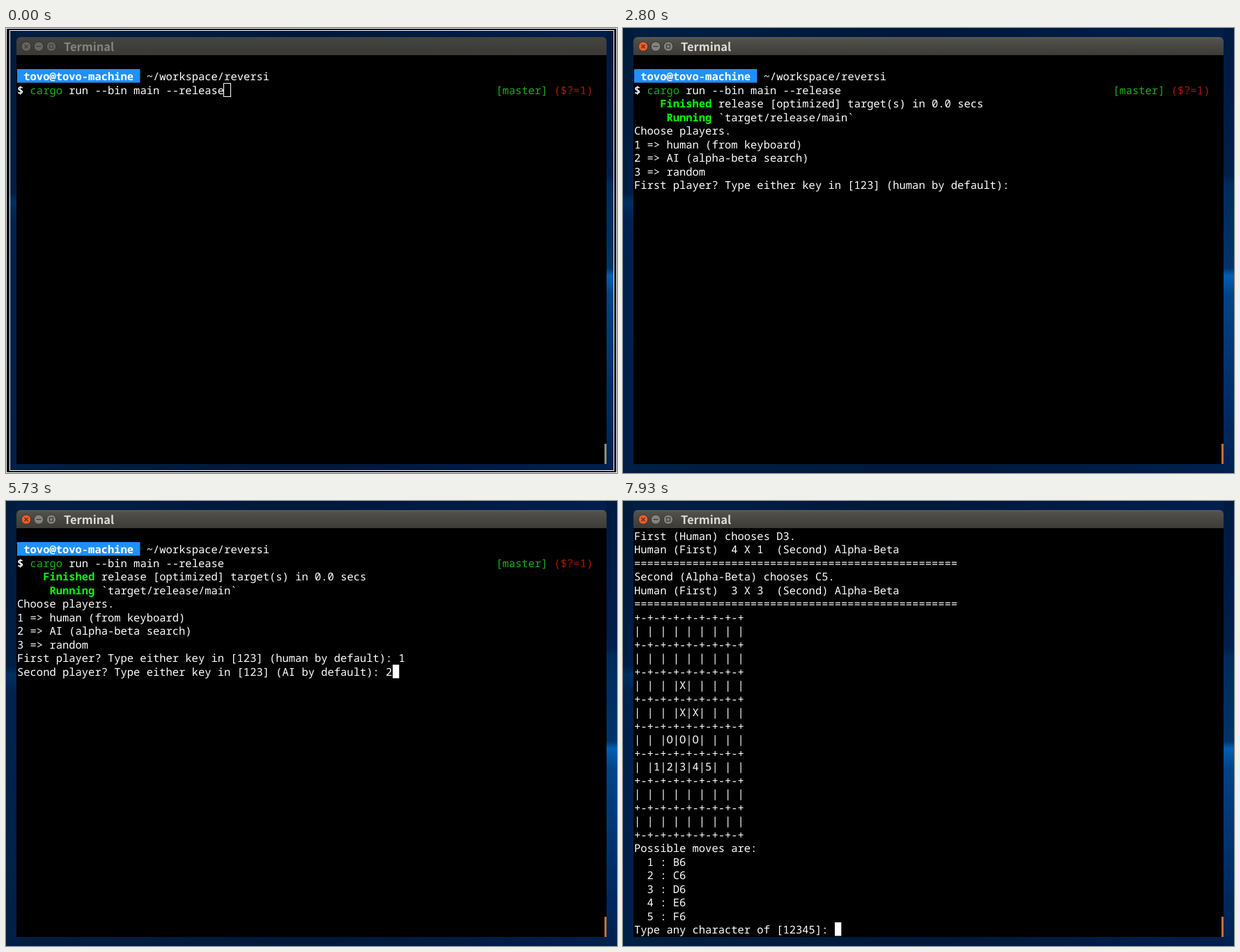
An HTML page with a canvas for the animation above (8000 ms loop, 877x639 px).

```html
<!DOCTYPE html>
<html lang="en">
<head>
<meta charset="utf-8">
<title>Terminal</title>
<style>
html, body { margin: 0; width: 877px; height: 639px; overflow: hidden; background: #001b40; }
canvas { display: block; }
</style>
</head>
<body>
<canvas id="stage" width="877" height="639"></canvas>
<script>
const ctx = document.getElementById('stage').getContext('2d');
const LOOP = 8000, W = 877, H = 639;
const LEFT = 16, TOP = 39.5, CELL = 9.286, ROW = 19.517, ROWS = 30;
const MONO = '"Noto Sans Mono", monospace';
const WHITE = '#fff', GREEN = '#18b218', LIME = '#00ff00', RED = '#b21800', BLUE = '#1e90ff';
const RULE = '='.repeat(50);

// A run is a piece of text in one style on a terminal line.
const run = (text, col = 0, color = WHITE, bold = false, back = null) => ({ text, col, color, bold, back });

function board(marks) {
  const edge = '+-'.repeat(8) + '+';
  const lines = [edge];
  for (let y = 1; y <= 8; y++) {
    lines.push('|' + [...(marks[y] || '').padEnd(8)].join('|') + '|', edge);
  }
  return lines;
}

function moves(list) {
  const keys = list.map((_, i) => i + 1).join('');
  return ['Possible moves are:', ...list.map((m, i) => `  ${i + 1} : ${m}`),
    `Type any character of [${keys}]: `];
}

// What the terminal prints, in order of time; 'more' goes on the same line.
const log = [
  { at: 0, lines: [
    '',
    [run(' tovo@tovo-machine ', 0, WHITE, true, BLUE), run('~/workspace/reversi', 20)],
    [run('$', 0, WHITE, true), run('cargo', 2, GREEN), run('run --bin main --release', 8),
      run('[master]', 74, GREEN), run('($?=1)', 83, RED)]
  ] },
  { at: 2800, lines: [
    [run('Finished', 4, LIME, true), run('release [optimized] target(s) in 0.0 secs', 13)],
    [run('Running', 5, LIME, true), run('`target/release/main`', 13)],
    'Choose players.',
    '1 => human (from keyboard)',
    '2 => AI (alpha-beta search)',
    '3 => random',
    'First player? Type either key in [123] (human by default): '
  ] },
  { at: 5000, more: '1' },
  { at: 5270, lines: ['Second player? Type either key in [123] (AI by default): '] },
  { at: 5670, more: '2' },
  { at: 6200, lines: [RULE,
    ...board({ 3: '   2', 4: '  1OX', 5: '   XO4', 6: '    3' }),
    ...moves(['C4', 'D3', 'E6', 'F5'])] },
  { at: 7470, more: '2' },
  { at: 7670, lines: [
    'First (Human) chooses D3.',
    'Human (First)  4 X 1  (Second) Alpha-Beta', RULE,
    'Second (Alpha-Beta) chooses C5.',
    'Human (First)  3 X 3  (Second) Alpha-Beta', RULE,
    ...board({ 3: '   X', 4: '   XX', 5: '  OOO', 6: ' 12345' }),
    ...moves(['B6', 'C6', 'D6', 'E6', 'F6'])] }
];

// Spans in which the solid text cursor is lit.
const lit = [[200, 730], [1330, 1930], [2200, 2800], [3870, 4270], [4870, 7200], [7470, LOOP]];

function linesAt(t) {
  const out = [];
  for (const step of log) {
    if (step.at > t) break;
    if (step.more) out[out.length - 1] += step.more;
    else out.push(...step.lines);
  }
  return out;
}

function rect(x, y, w, h, fill) {
  ctx.fillStyle = fill;
  ctx.fillRect(x, y, w, h);
}

function blend(x0, y0, x1, y1, stops) {
  const g = ctx.createLinearGradient(x0, y0, x1, y1);
  stops.forEach(([p, c]) => g.addColorStop(p, c));
  return g;
}

function drawDesktop() {
  rect(0, 0, W, H, blend(0, 0, W, 0, [[0, '#001f42'], [0.5, '#00183a'], [1, '#001f4c']]));
  rect(0, 0, 15, H, blend(0, 0, 0, H,
    [[0, '#001c3c'], [0.37, '#001d44'], [0.39, '#003060'], [0.43, '#00224e'], [1, '#002048']]));
  rect(862, 0, 15, H, blend(0, 0, 0, H,
    [[0, '#001a40'], [0.33, '#001f4a'], [0.35, '#002c5c'], [0.54, '#003468'],
      [0.556, '#0060b4'], [0.6, '#004488'], [0.8, '#00306c'], [1, '#002050']]));
}

function drawButton(x, fill, mark, ring) {
  ctx.beginPath();
  ctx.arc(x, 26.5, 6.8, 0, 7);
  ctx.fillStyle = fill;
  ctx.fill();
  ctx.lineWidth = 1;
  ctx.strokeStyle = ring;
  ctx.stroke();
  ctx.strokeStyle = mark;
  ctx.lineWidth = 1.2;
}

function drawWindow(active) {
  rect(15, 38, 847, 588, '#000');
  ctx.beginPath();
  ctx.roundRect(15, 13, 847, 26, [6, 6, 0, 0]);
  ctx.fillStyle = active ? blend(0, 13, 0, 39, [[0, '#5c5b56'], [0.15, '#504f4a'], [1, '#3c3b37']])
    : blend(0, 13, 0, 39, [[0, '#444440'], [1, '#3a3936']]);
  ctx.fill();

  const mark = active ? '#3a3834' : '#3c3b38';
  const gray = active ? '#86847a' : '#666560';
  const ring = active ? '#34332f' : '#33322f';
  drawButton(29, active ? '#e8602c' : gray, active ? '#6a2410' : mark, ring);
  ctx.beginPath();
  ctx.moveTo(26.5, 24); ctx.lineTo(31.5, 29);
  ctx.moveTo(31.5, 24); ctx.lineTo(26.5, 29);
  ctx.stroke();
  drawButton(47, gray, mark, ring);
  ctx.beginPath();
  ctx.moveTo(43.5, 26.5); ctx.lineTo(50.5, 26.5);
  ctx.stroke();
  drawButton(65, gray, mark, ring);
  ctx.strokeRect(62.5, 24, 5, 5);

  ctx.font = 'bold 16.5px "Noto Sans CJK JP", "Noto Sans", sans-serif';
  ctx.fillStyle = active ? '#dfdbd2' : '#85837c';
  ctx.fillText('Terminal', 83, 32.5);
  rect(859, 597, 3, 29, active ? '#c07038' : '#8c8c7c');
}

function drawLine(line, row) {
  const y = TOP + row * ROW;
  const runs = typeof line === 'string' ? [run(line)] : line;
  for (const { text, col, color, bold, back } of runs) {
    const x = LEFT + col * CELL;
    if (back) rect(x, y, text.length * CELL, ROW, back);
    ctx.font = `${bold ? 'bold ' : ''}${CELL / 0.6}px ${MONO}`;
    ctx.fillStyle = color;
    ctx.fillText(text, x, y + 16);
  }
}

function drawCursor(t, col, row) {
  const x = Math.round(LEFT + col * CELL), y = Math.round(TOP + row * ROW);
  if (t < 200) {
    ctx.strokeStyle = WHITE;
    ctx.lineWidth = 1;
    ctx.strokeRect(x - 0.5, y + 0.5, 10, 19);
  } else if (lit.some(([a, b]) => t >= a && t < b)) {
    rect(x, y, 9.3, 19.5, WHITE);
  }
}

function drawPointer(x, y) {
  rect(x - 0.5, y - 5, 1, 11, '#ddd');
  rect(x - 3, y - 6, 6, 1, '#ddd');
  rect(x - 3, y + 6, 6, 1, '#ddd');
}

// The selected region's outline, which fades away.
function drawOutline(alpha) {
  ctx.globalAlpha = alpha;
  ctx.strokeStyle = '#000';
  ctx.lineWidth = 4;
  ctx.strokeRect(2, 2, W - 4, H - 4);
  ctx.strokeStyle = WHITE;
  ctx.lineWidth = 1;
  ctx.strokeRect(0.5, 0.5, W - 1, H - 1);
  ctx.strokeRect(5.5, 3.5, W - 10, H - 7);
  ctx.globalAlpha = 1;
}

function draw(t) {
  ctx.textRendering = 'geometricPrecision';
  drawDesktop();
  drawWindow(t >= 200);
  const lines = linesAt(t);
  const first = Math.max(0, lines.length - ROWS);
  lines.slice(first).forEach(drawLine);

  const last = lines[lines.length - 1];
  const row = lines.length - 1 - first;
  if (typeof last === 'string') drawCursor(t, last.length, row);
  else if (t < 2200) drawCursor(t, 32, row);
  else drawCursor(t, 0, row + 1);

  if (t >= 600 && t < 2200) drawPointer(424, 241);
  if (t < 1000) drawOutline(t < 200 ? 1 : (1 - (t - 200) / 800) ** 3);
}

function tick(now) {
  draw(now % LOOP);
  requestAnimationFrame(tick);
}
draw(0);
requestAnimationFrame(tick);
</script>
</body>
</html>
```
